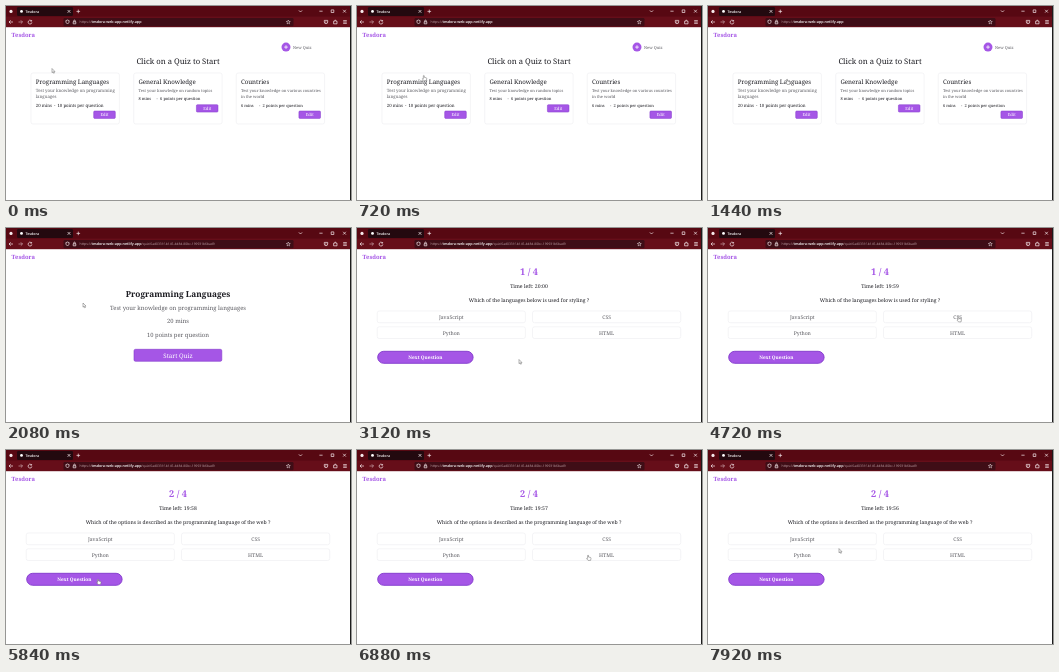
Write an HTML page with a canvas that moves like this. It is 345x194 px and loops after 8000 ms.

```html
<!DOCTYPE html>
<html lang="en">
<head>
<meta charset="utf-8">
<title>Quiz app</title>
<style>
html, body { margin: 0; width: 100%; height: 100%; overflow: hidden; background: #fff; }
canvas { display: block; width: 100%; height: 100%; }
</style>
</head>
<body>
<canvas id="stage"></canvas>
<script>
const W = 345, H = 194, LOOP = 8000, STEP = 80;
const canvas = document.getElementById('stage');
const ctx = canvas.getContext('2d');

const SERIF = '"Noto Serif", serif';
const SANS = '"Open Sans", sans-serif';
const PURPLE = '#a556e6', EDGE = '#8238cc', INK = '#1c1c22', GREY = '#5c5c62', LINE = '#ececf0';

// Scene changes
const DETAIL_AT = 1680, QUESTION_AT = 2880, SECOND_AT = 5840, TIMER_AT = 2960;

// Pointer tip: time, x, y
const PATH = [
  [0, 46, 62.5], [240, 46, 62.5], [1040, 78, 73], [1440, 79, 73], [1760, 78, 73.5],
  [2080, 77, 75], [2640, 162, 129], [2880, 162, 130], [3120, 162, 131.5],
  [3760, 178, 118], [4480, 250, 88.5], [5000, 251, 88.5], [5520, 92, 129],
  [5920, 92, 129], [6800, 231, 105], [7120, 231, 105], [7840, 131, 98.6], [8000, 131, 98.6]
];

const CARDS = [
  { x: 25, title: 'Programming Languages', size: 4.35,
    lines: ['Test your knowledge on programming', 'languages'],
    mins: '20 mins', points: '10 points per question' },
  { x: 127.7, title: 'General Knowledge', size: 4,
    lines: ['Test your knowledge on random topics'],
    mins: '8 mins', points: '6 points per question' },
  { x: 230.2, title: 'Countries', size: 4,
    lines: ['Test your knowledge on various countries', 'in the world'],
    mins: '6 mins', points: '2 points per question' }
];
const OPTIONS = ['JavaScript', 'CSS', 'Python', 'HTML'].map((label, i) => ({
  label, box: [i % 2 ? 175.5 : 20.2, i < 2 ? 83 : 98.8, 148.2, 11.7]
}));
const START = [128, 121.3, 87.8, 12];
const NEXT = [20.7, 123.3, 95.4, 12];

function text(str, x, y, size, color = INK, align = 'left', weight = 400, family = SERIF) {
  ctx.font = `${weight} ${size}px ${family}`;
  ctx.textAlign = align;
  ctx.fillStyle = color;
  ctx.fillText(str, x, y);
  return ctx.measureText(str).width;
}

function rect(x, y, w, h, color) {
  ctx.fillStyle = color;
  ctx.fillRect(x, y, w, h);
}

function round([x, y, w, h], r, fill, stroke, lw = 0.6) {
  ctx.beginPath();
  ctx.roundRect(x, y, w, h, r);
  if (fill) { ctx.fillStyle = fill; ctx.fill(); }
  if (stroke) { ctx.strokeStyle = stroke; ctx.lineWidth = lw; ctx.stroke(); }
}

function dot(x, y, r, color) {
  ctx.beginPath();
  ctx.arc(x, y, r, 0, Math.PI * 2);
  ctx.fillStyle = color;
  ctx.fill();
}

function icon(d, x, y, color = '#f6eaec', lw = 0.7) {
  ctx.save();
  ctx.translate(x, y);
  ctx.strokeStyle = color;
  ctx.lineWidth = lw;
  ctx.stroke(new Path2D(d));
  ctx.restore();
}

const CROSS = 'M-1.4 -1.4L1.4 1.4M1.4 -1.4L-1.4 1.4';

function browser(path) {
  rect(0, 0, W, 11, '#570812');
  rect(0, 10.6, W, 10.6, '#660e19');
  round([11, 1, 56, 9], 1.2, '#23090f');
  dot(5, 5.4, 1.6, '#f6eaec');
  dot(15.5, 5.4, 1.4, '#fff');
  text('Tesdora', 19.5, 6.8, 3.6, '#fff', 'left', 600, SANS);
  icon(CROSS, 63, 5.4);
  icon('M-1.8 0H1.8M0 -1.8V1.8', 72.3, 5.4);
  icon('M-1.6 -.8L0 .8L1.6 -.8', 294.5, 5.2);
  icon('M-1.6 0H1.6', 315, 5.2);
  icon('M-1.3 -1.3H1.3V1.3H-1.3Z', 326.5, 5.2);
  icon(CROSS, 338.5, 5.2);

  round([57.5, 12, 230, 8.2], 1.2, '#3f0d16');
  icon('M2 0H-2M-.3 -1.7L-2 0L-.3 1.7', 5, 16);
  icon('M-2 0H2M.3 -1.7L2 0L.3 1.7', 14.5, 16, '#c9a5ab');
  icon('M1.4 -1.2A1.9 1.9 0 1 0 1.9 .4M1.6 -2V-.8H.4', 24, 16);
  icon('M0 -2L1.7 -1.3Q1.7 1.1 0 2Q-1.7 1.1 -1.7 -1.3Z', 61.5, 16);
  icon('M-1.3 -.2H1.3V1.8H-1.3ZM-.8 -.2V-1.1A.8 .8 0 0 1 .8 -1.1V-.2', 68.5, 16);
  icon('M0 -2L.6 -.6L2 -.5L.9 .5L1.2 1.9L0 1.1L-1.2 1.9L-.9 .5L-2 -.5L-.6 -.6Z', 282.3, 16, '#f6eaec', 0.5);
  icon('M-1.7 -1.6H1.7V0A1.7 1.7 0 0 1 -1.7 0ZM-.8 -.4L0 .4L.8 -.4', 320, 16);
  icon('M-1.7 -.8H-.5V-1.8H.5V-.8H1.7V1.8H-1.7Z', 329.3, 16);
  icon('M-1.8 -1.4H1.8M-1.8 0H1.8M-1.8 1.4H1.8', 339, 16);

  let x = 73.5;
  const url = (str, size, color, weight) => {
    x += text(str, x, 17.3, size, color, 'left', weight, SANS);
  };
  url('https://', 3.5, '#c0a2a8', 400);
  url('tesdora-web-app.netlify.app', 3.7, '#fff', 600);
  url(path, 3.3, '#c0a2a8', 400);

  text('Tesdora', 5.5, 30.9, 5.8, PURPLE, 'left', 600);
}

function listPage() {
  dot(280, 41.1, 4.5, PURPLE);
  icon('M-1.8 0H1.8M0 -1.8V1.8', 280, 41.1, '#fff', 0.8);
  text('New Quiz', 287, 42.6, 4, GREY);
  text('Click on a Quiz to Start', 172, 58.3, 7.7, INK, 'center');
  for (const c of CARDS) {
    round([c.x, 67, 88.4, 51], 2, '#fff', LINE);
    const left = c.x + 4.7;
    text(c.title, left, 77.5, 6.15);
    c.lines.forEach((s, i) => text(s, left, 86 + i * 6.4, c.size, GREY));
    const y = 94.2 + (c.lines.length - 1) * 6.3;
    text(c.mins, left, y, c.size);
    text('-', left + 18.2, y, c.size);
    text(c.points, left + 21.7, y, c.size);
    round([c.x + 62.7, y + 4.5, 21.6, 7.4], 1, PURPLE, EDGE, 0.5);
    text('Edit', c.x + 73.5, y + 9.7, 4.2, '#fff', 'center');
  }
}

function detailPage() {
  text('Programming Languages', 172, 69, 8.3, INK, 'center', 600);
  text('Test your knowledge on programming languages', 172, 82.2, 5.85, GREY, 'center');
  text('20 mins', 172, 95.4, 5.85, GREY, 'center');
  text('10 points per question', 172, 108.5, 5.85, GREY, 'center');
  round(START, 1.5, PURPLE, EDGE);
  text('Start Quiz', 172, 129.5, 6.2, '#fff', 'center');
}

function questionPage(t) {
  const second = t >= SECOND_AT;
  const left = 1200 - Math.max(0, Math.floor((t - TIMER_AT) / 1000));
  const clock = Math.floor(left / 60) + ':' + String(left % 60).padStart(2, '0');
  text(second ? '2 / 4' : '1 / 4', 172, 47.2, 9.3, PURPLE, 'center', 600);
  text('Time left: ' + clock, 172, 60.4, 5.15, INK, 'center');
  text(second ? 'Which of the options is described as the programming language of the web ?'
              : 'Which of the languages below is used for styling ?', 172, 73.6, 5.08, INK, 'center');
  for (const { label, box } of OPTIONS) {
    round(box, 2, '#fff', LINE);
    text(label, box[0] + box[2] / 2, box[1] + 7.8, 5.1, GREY, 'center');
  }
  round(NEXT, 6, PURPLE, EDGE, 0.9);
  text('Next Question', 68.3, 131.2, 4.75, '#fff', 'center', 600);
}

function pointerAt(t) {
  let i = 1;
  while (i < PATH.length - 1 && PATH[i][0] < t) i++;
  const [t0, x0, y0] = PATH[i - 1], [t1, x1, y1] = PATH[i];
  const p = (t - t0) / (t1 - t0);
  const e = p * p * (3 - 2 * p);
  return [x0 + (x1 - x0) * e, y0 + (y1 - y0) * e];
}

function hotspots(t) {
  if (t < DETAIL_AT) return CARDS.map(c => [c.x, 67, 88.4, 51]);
  if (t < QUESTION_AT) return [START];
  return [...OPTIONS.map(o => o.box), NEXT];
}

const ARROW = new Path2D('M0 0V4.2L1 3.3L1.7 4.8L2.4 4.5L1.7 3.1H3Z');
const HAND = new Path2D('M-.4 .4Q0 -.2 .5 .4V2L2.6 2.5Q3.1 2.7 3 3.3L2.6 5.4H.1L-1.4 3.6Q-1.3 2.9 -.4 3.4Z');

function pointer(t) {
  const [x, y] = pointerAt(t);
  const over = hotspots(t).some(([l, u, w, h]) => x > l && x < l + w && y > u && y < u + h);
  const shape = over ? HAND : ARROW;
  ctx.save();
  ctx.translate(x, y);
  ctx.fillStyle = '#fff';
  ctx.strokeStyle = '#666';
  ctx.lineWidth = 0.5;
  ctx.fill(shape);
  ctx.stroke(shape);
  ctx.restore();
}

function draw(now) {
  const t = Math.floor((now % LOOP) / STEP) * STEP;
  const dpr = window.devicePixelRatio || 1;
  const w = Math.round(innerWidth * dpr), h = Math.round(innerHeight * dpr);
  if (canvas.width !== w || canvas.height !== h) {
    canvas.width = w;
    canvas.height = h;
  }
  ctx.setTransform(w / W, 0, 0, h / H, 0, 0);
  ctx.textRendering = 'geometricPrecision';
  rect(0, 0, W, H, '#fff');
  browser(t < DETAIL_AT ? '' : '/quiz/6ad0331f-b145-4d8d-80bc-199931b6bad9');
  if (t < DETAIL_AT) listPage();
  else if (t < QUESTION_AT) detailPage();
  else questionPage(t);
  rect(W - 1, 0, 1, H, '#1c1c1c');
  pointer(t);
}

const begin = performance.now();
function tick() {
  draw(performance.now() - begin);
  requestAnimationFrame(tick);
}
tick();
</script>
</body>
</html>
```
